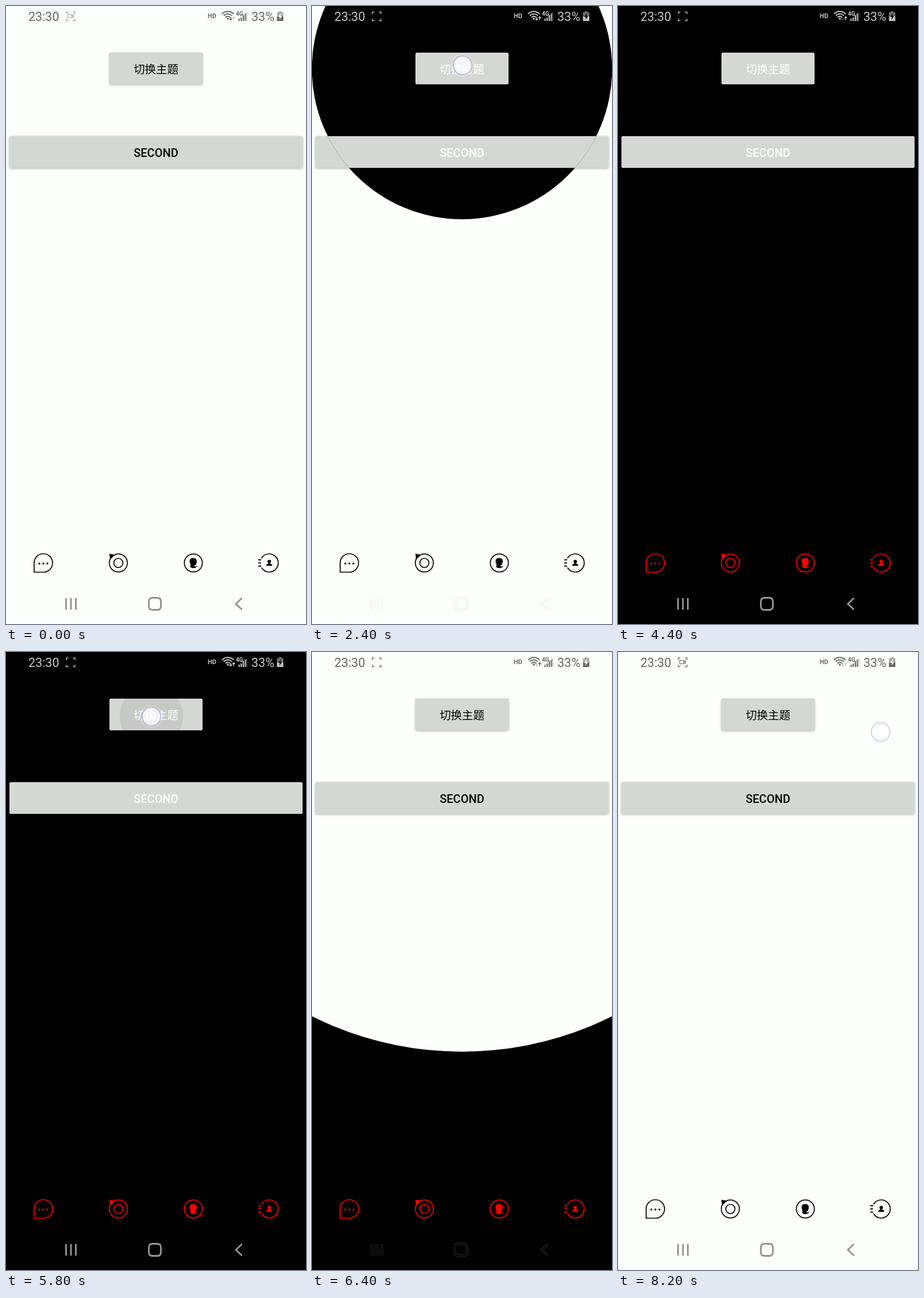
These frames come from a looping animation (522x1073 px, 8500 ms). An HTML page with a canvas:

```html
<!DOCTYPE html>
<html lang="zh-CN">
<head>
<meta charset="utf-8">
<title>Theme switch</title>
<style>
html, body { margin: 0; width: 522px; height: 1073px; overflow: hidden; background: #fdfffc; }
canvas { display: block; }
</style>
</head>
<body>
<canvas id="stage" width="522" height="1073"></canvas>
<script>
const ctx = document.getElementById('stage').getContext('2d');
const TAU = Math.PI * 2;
const LOOP = 8500, STEP = 100;
const REVEAL = 1033, TO_DARK = 2047, TO_LIGHT = 5827, MAX_R = 999;
const CX = 261, CY = 109;
const PAPER = '#fdfffc';

const clamp = v => Math.min(1, Math.max(0, v));
const between = (t, a, b) => t >= a && t < b;

function path(d, width) {
  const p = new Path2D(d);
  if (!width) return ctx.fill(p);
  ctx.lineWidth = width;
  ctx.stroke(p);
}

function circle(x, y, r, width) {
  ctx.beginPath();
  ctx.arc(x, y, r, 0, TAU);
  if (!width) return ctx.fill();
  ctx.lineWidth = width;
  ctx.stroke();
}

function text(str, x, y, font, align = 'left') {
  ctx.font = font;
  ctx.textAlign = align;
  ctx.fillText(str, x, y);
}

function ink(color) {
  ctx.fillStyle = ctx.strokeStyle = color;
}

function buttonShape(x, y, w, h) {
  ctx.beginPath();
  ctx.roundRect(x, y, w, h, 2.5);
}

function button(x, y, w, dark) {
  ctx.save();
  ctx.fillStyle = '#d5d7d4';
  if (!dark) {
    ctx.shadowColor = 'rgba(0,0,0,.32)';
    ctx.shadowBlur = 4;
    ctx.shadowOffsetY = 1;
  }
  buttonShape(x, y, w, 55);
  ctx.fill();
  ctx.restore();
}

function ripple(touch) {
  ctx.save();
  buttonShape(180, 81, 162, 55);
  ctx.clip();
  ctx.fillStyle = 'rgba(0,0,0,.065)';
  circle(touch.x, touch.y, 55);
  ctx.restore();
}

function tabs(color) {
  ink(color);
  // chat
  path('M49 983V967A16 16 0 1 1 65 983Z', 1.7);
  for (const x of [58, 65, 72]) circle(x, 968, 1.7);
  // lens
  circle(195.5, 967, 15.7, 1.7);
  circle(195.5, 967, 8, 1.7);
  path('M180 951L190 953L181 961Z');
  // profile
  circle(326, 967, 15.7, 1.7);
  path('M320 967C318 960 322 958.500 326 958.500C331 958.500 333 962 331.500 967C331 971 328 972 327 972' +
       'C329 974 331 973 333 972C331 977 322 977 320 973C322 972 321 970 320 967Z');
  // contacts
  path('M444.500 959A15.700 15.700 0 1 1 444.500 975', 1.7);
  path('M439 961.500H444M439 967H443.500M439 972.500H444', 1.9);
  circle(458, 964.5, 3);
  path('M456.500 966H459.500V968C463 969 463 970 463 972H453C453 970 453 969 456.500 968Z');
}

function navShapes(width) {
  path('M104.500 1028V1048M113 1028V1048M121.500 1028V1048', width);
  path('M255 1027.500H263Q269.500 1027.500 269.500 1034V1042Q269.500 1048.500 263 1048.500H255' +
       'Q248.500 1048.500 248.500 1042V1034Q248.500 1027.500 255 1027.500Z', width);
  path('M410.500 1028L400 1038L410.500 1048', width);
}

// Outgoing screens keep only a faint outline of the navigation keys.
function nav(dark, ghost) {
  if (ghost) {
    ink(dark ? '#2c2c2c' : '#ececea');
    navShapes(4.2);
    ink(dark ? '#000' : PAPER);
    navShapes(2.2);
  } else {
    ink(dark ? '#999' : '#8f908f');
    navShapes(2.8);
  }
}

function screen(dark, ghost, touch) {
  ctx.fillStyle = dark ? '#000' : PAPER;
  ctx.fillRect(0, 0, 522, 1073);
  button(180, 81, 162, dark);
  button(6, 226, 510, dark);
  if (touch) ripple(touch);
  ctx.fillStyle = dark ? '#fff' : '#000';
  text('切换主题', CX, 116.5, '19.4px "Noto Sans CJK SC", "Noto Sans CJK", sans-serif', 'center');
  text('SECOND', CX, 261.5, '500 20px Roboto, sans-serif', 'center');
  tabs(dark ? '#f00' : '#000');
  nav(dark, ghost);
}

function status(t) {
  const dark = clamp((t - 2020) / 150) - clamp((t - 5820) / 150);
  const level = Math.round(102 + 98 * dark);
  ink(`rgb(${level},${level},${level})`);
  const faded = (alpha, draw) => {
    ctx.globalAlpha = alpha;
    draw();
    ctx.globalAlpha = 1;
  };

  text('23:30', 39, 26, '21.5px Roboto, sans-serif');
  text('33%', 427, 26, '21.5px Roboto, sans-serif');
  text('HD', 351, 21, 'bold 10.8px Roboto, sans-serif');
  text('4G', 400, 17, 'bold 10px Roboto, sans-serif');

  // recording badge, its camera blinks twice a second
  faded(t < 400 ? .6 : 1, () => {
    path('M105 14V10.500H108.500M116.500 10.500H120V14M120 22V25.500H116.500M108.500 25.500H105V22', 1.3);
    const blinkOn = t < 400 || Math.floor((t - 400) / 500) % 2 === 1;
    if (blinkOn) path('M107.500 14.500H114.500V20.500H107.500ZM114.500 17L117.500 15V20L114.500 18Z', 1.1);
  });

  // wifi
  for (const r of [5.5, 9.7, 14]) {
    ctx.beginPath();
    ctx.arc(386, 23.5, r, -Math.PI * .76, -Math.PI * .24);
    ctx.lineWidth = 1.9;
    ctx.stroke();
  }
  circle(386, 22, 1.8);

  // data arrows
  const down = !(between(t, 3100, 5200) || between(t, 6200, 7200) || t >= 8200);
  const up = between(t, 1100, 8200);
  faded(down ? 1 : .35, () => path('M391 19V24M388.800 22L391 24.500L393.200 22', 1.4));
  faded(up ? 1 : .35, () => path('M396.300 24.500V19M394 21L396.300 18.500L398.600 21', 1.4));

  // signal
  [4, 6, 10].forEach((h, i) => ctx.fillRect(404.5 + i * 3.7, 26 - h, 2.2, h));
  ctx.fillRect(415.4, 13, 2, 13);
  faded(.4, () => ctx.fillRect(418, 11, 1.7, 15));

  // battery
  faded(.55, () => path('M474.500 9H479.500V11H482.500V18H471.500V11H474.500Z'));
  ctx.fillRect(471.5, 18, 11, 8);
  ctx.fillStyle = dark > .5 ? '#000' : PAPER;
  path('M478.500 12L473.500 19H476.500L475.500 24L480.500 17.500H477.500Z');
}

function touchDot({ x, y }, faint) {
  ctx.fillStyle = 'rgba(255,255,255,.16)';
  circle(x, y, 20);
  ctx.fillStyle = 'rgba(255,255,255,.72)';
  circle(x, y, 16);
  ctx.strokeStyle = faint ? '#d0cee4' : '#b9b5d6';
  circle(x, y, 16.2, 1.8);
}

function touchAt(t) {
  if (between(t, 2000, 2500)) return { x: 262, y: 103 };
  if (between(t, 5800, 6300)) return { x: 253, y: 112 };
  if (t >= 8200) return { x: 457, y: 139 };
}

function draw(t) {
  const touch = touchAt(t);
  const dark = between(t, TO_DARK + REVEAL, TO_LIGHT + REVEAL);
  const u = (t - (t < 4000 ? TO_DARK : TO_LIGHT)) / REVEAL;
  const moving = u > 0 && u < 1;

  screen(dark, moving, t < 8200 && touch);
  if (moving) {
    ctx.save();
    ctx.beginPath();
    ctx.arc(CX, CY, MAX_R * (1 - Math.cos(Math.PI * u)) / 2, 0, TAU);
    ctx.clip();
    screen(!dark);
    ctx.restore();
  }
  status(t);
  if (touch) touchDot(touch, t >= 8200);
}

const start = performance.now();
function tick() {
  const t = (performance.now() - start) % LOOP;
  draw(Math.floor(t / STEP) * STEP);
  requestAnimationFrame(tick);
}
tick();
</script>
</body>
</html>
```
